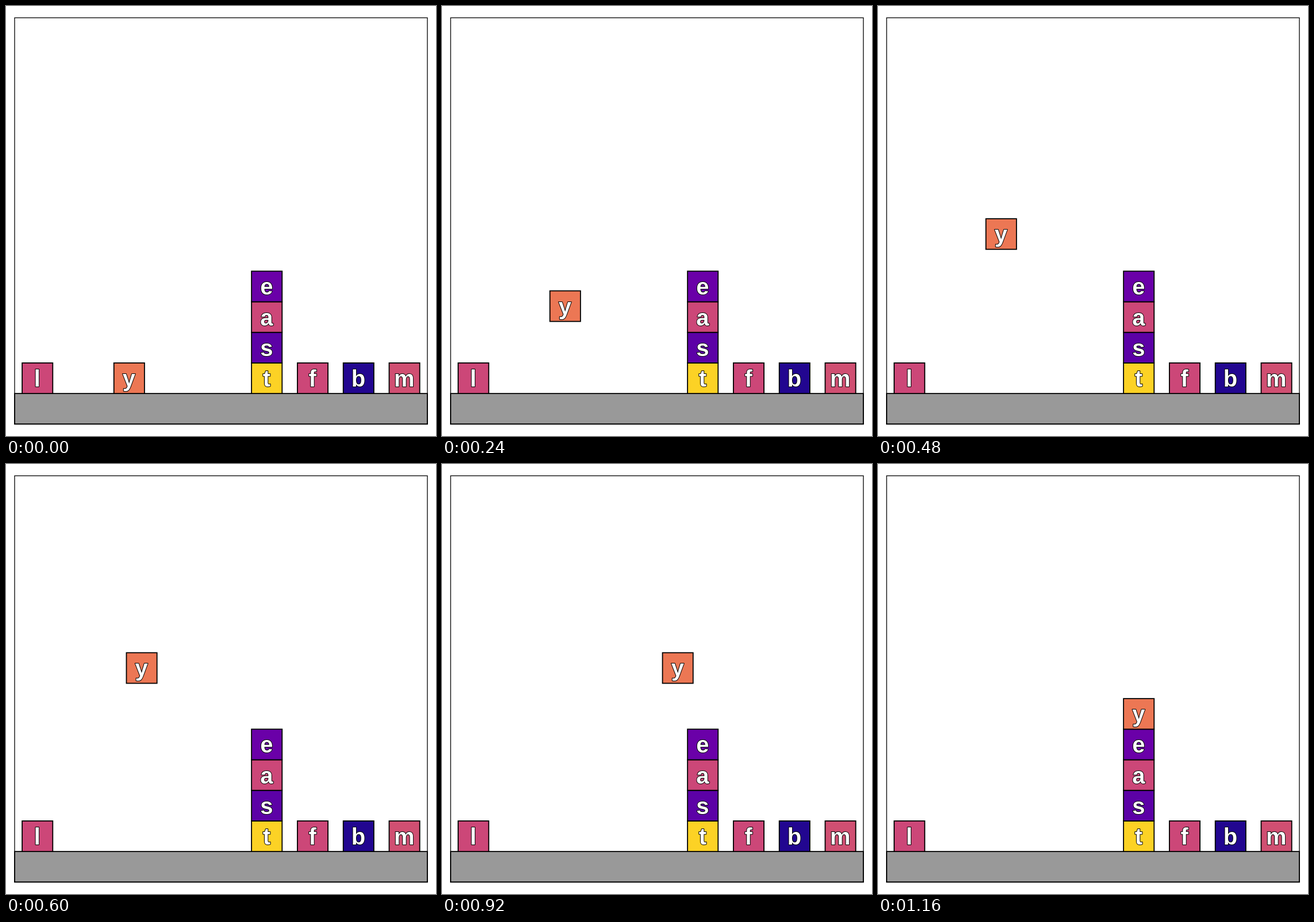
An HTML page that plays this animation: 748x748 px, repeating every 1.2 s.

```html
<!DOCTYPE html>
<html lang="en">
<head>
<meta charset="utf-8">
<title>Letter blocks</title>
<style>
  html, body { margin: 0; width: 100%; height: 100%; overflow: hidden; background: #fff; }
  svg { display: block; width: 100%; height: 100%; }
  rect { stroke: #000; stroke-width: 1.8; }
  .frame { fill: none; stroke-width: 1.3; }
  text {
    font: bold 40px "Liberation Sans", Arial, sans-serif;
    text-anchor: middle;
    fill: #fff;
    stroke: #000;
    stroke-width: 2;
    stroke-linejoin: round;
    paint-order: stroke;
  }
</style>
</head>
<body>
<svg id="stage" viewBox="0 0 748 748"></svg>
<script>
const NS = "http://www.w3.org/2000/svg";
const stage = document.getElementById("stage");
const UNIT = 53.2;
const FLOOR = 674.1;
const FRAME = { x: 15, y: 20.5, width: 718, height: 706.8 };
const STEP = 40;
const STEPS = 30;

function add(parent, tag, attrs = {}) {
  const node = document.createElementNS(NS, tag);
  for (const key in attrs) node.setAttribute(key, attrs[key]);
  return parent.appendChild(node);
}

// Columns are 1.5 units apart; levels count upward from the floor.
const columnX = column => 28.1 + column * 1.5 * UNIT;
const levelY = level => FLOOR - (level + 1) * UNIT;

function place(block, column, level) {
  block.setAttribute("transform", `translate(${columnX(column)} ${levelY(level)})`);
}

function addBlock(letter, fill, column, level) {
  const block = add(stage, "g");
  add(block, "rect", { width: UNIT, height: UNIT, fill });
  add(block, "text", { x: UNIT / 2 - 0.4, y: 41.1 }).textContent = letter;
  place(block, column, level);
  return block;
}

add(stage, "rect", { x: FRAME.x, y: FLOOR, width: FRAME.width, height: UNIT, fill: "#999" });
addBlock("l", "#cc4778", 0, 0);
addBlock("t", "#fcd225", 5, 0);
addBlock("s", "#5c01a6", 5, 1);
addBlock("a", "#cc4778", 5, 2);
addBlock("e", "#6a00a8", 5, 3);
addBlock("f", "#cc4778", 6, 0);
addBlock("b", "#220690", 7, 0);
addBlock("m", "#d04f72", 8, 0);
const mover = addBlock("y", "#ec7754", 2, 0);
add(stage, "rect", { class: "frame", ...FRAME });

// Linear progress from step a to step b.
const ramp = (step, a, b) => Math.min(1, Math.max(0, (step - a) / (b - a)));

function draw(ms) {
  const step = Math.floor(ms / STEP) % STEPS;
  const lift = 5.5 * ramp(step, 0, 14);
  const slide = 3 * ramp(step, 14, 25);
  const drop = 1.5 * ramp(step, 25, 29);
  place(mover, 2 + slide, lift - drop);
}

const start = performance.now();
function tick() {
  draw(performance.now() - start);
  requestAnimationFrame(tick);
}
tick();
</script>
</body>
</html>
```
